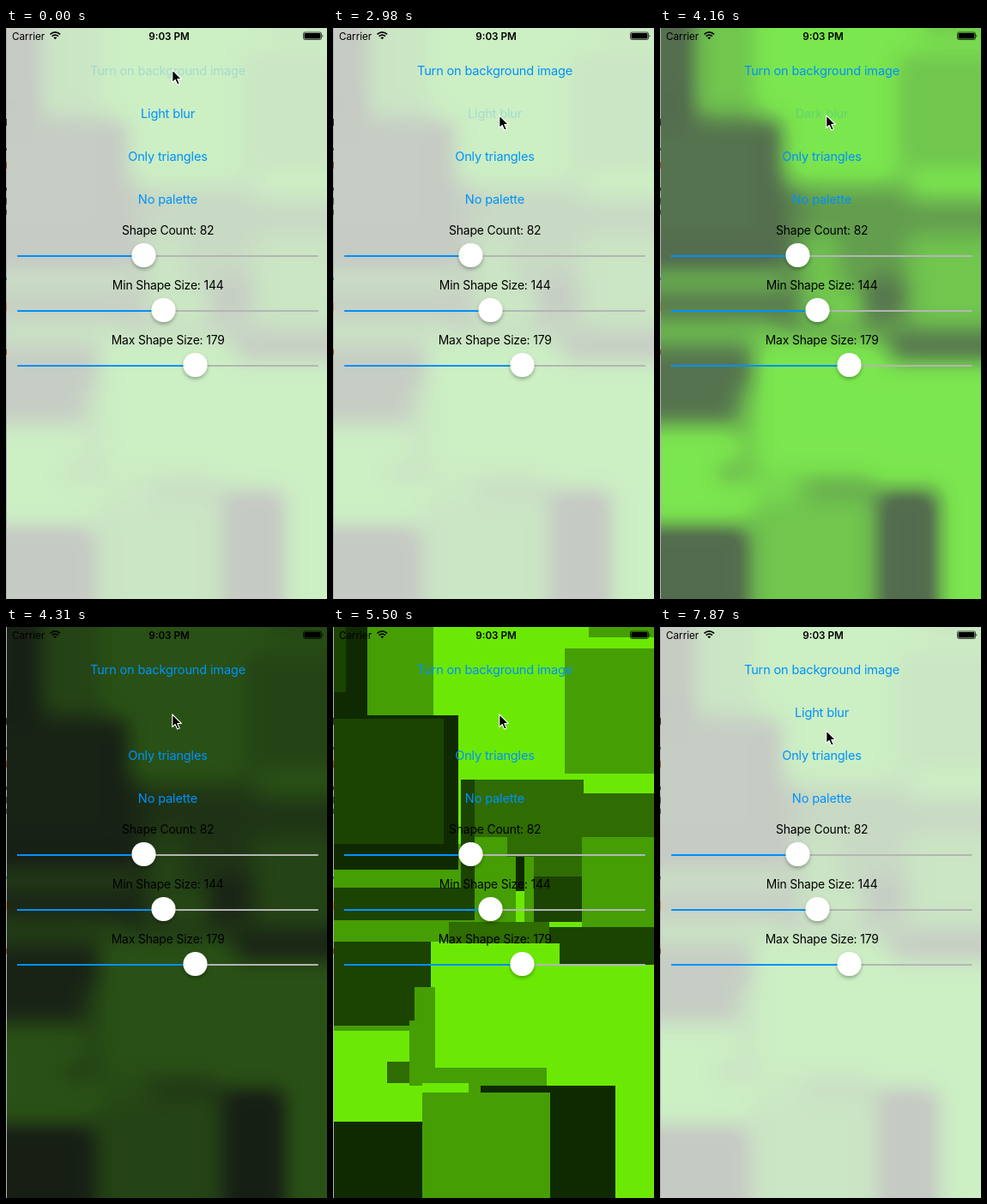
Animation of 374 by 666 pixels, one loop 8000 ms. Source, as an HTML page:

```html
<!DOCTYPE html>
<html lang="en">
<head>
<meta charset="utf-8">
<title>Background generator settings</title>
<style>
  html, body { margin: 0; width: 100%; height: 100%; overflow: hidden; }
  svg { display: block; width: 374px; height: 666px; }
  text { font-family: Inter, Roboto, sans-serif; text-anchor: middle; letter-spacing: -.16px; }
  .button { font-size: 14.55px; fill: #0091fa; }
  .label { font-size: 13.9px; }
  .status { font-size: 11.7px; letter-spacing: 0; }
</style>
</head>
<body>
<svg viewBox="0 0 374 666">
  <defs id="filters"></defs>
  <g id="shapes" shape-rendering="crispEdges"></g>
  <g id="edge" shape-rendering="crispEdges"><rect width="1" height="666" fill="#b2b0b5"/></g>

  <text class="status" x="7" y="13.5" style="text-anchor:start">Carrier</text>
  <g fill="none" stroke="#000" stroke-width="1.7">
    <path d="M51.5 7.4Q57.3 2.2 63.1 7.4M53.6 9.7Q57.3 6.4 61 9.7"/>
    <path d="M55.3 11.2Q57.3 9.6 59.3 11.2L57.3 13.3Z" fill="#000" stroke="none"/>
  </g>
  <text class="status" x="190" y="13.5" font-weight="600">9:03 PM</text>
  <rect x="346.5" y="5" width="21" height="8.5" rx="1.8" fill="none" stroke="#000" stroke-width=".7"/>
  <rect x="347.5" y="6" width="19" height="6.5" rx="1"/>
  <path d="M368.6 7.5q1.8 1.7 0 3.4z"/>

  <text id="title" class="button" x="188.5" y="54.5"></text>
  <text id="blur" class="button" x="188.5" y="104.5"></text>
  <text class="button" x="188.5" y="154.5">Only triangles</text>
  <text class="button" x="188.5" y="204.5">No palette</text>
  <g id="sliders"></g>
  <path id="cursor" d="M.8 .9V15.6L4.2 12.5L6.6 18L9.2 16.9L6.8 11.5H11.4Z"
        stroke="#fff" stroke-width="1.1" stroke-linejoin="round"/>
</svg>
<script>
const $ = id => document.getElementById(id);
const STAGE = [374, 666], BLEED = 60, LOOP = 8000;

// Shapes: colour, left, top, right, bottom
const palette = { A: '#6be905', B: '#459e03', C: '#2f6c01', D: '#1b4302', E: '#0f2a01' };
const shapes = `A 0 0 374 666
B 40 0 117 103
E 0 0 40 103
D 0 0 15 76
B 298 0 374 12
B 270 25 374 171
C 149 178 292 268
C 290 194 374 245
B 0 253 234 367
B 165 245 203 268
C 203 245 290 344
D 149 178 165 304
B 165 268 234 344
E 213 268 223 308
A 213 308 223 344
E 0 103 146 283
D 0 107 129 253
D 0 304 165 342
D 234 291 290 344
B 290 245 374 350
C 135 344 252 369
D 252 350 374 394
A 114 369 264 420
D 0 367 114 465
B 0 465 89 471
B 95 420 119 514
B 89 459 119 532
B 89 514 249 535
A 104 532 158 543
B 158 532 172 543
C 63 507 89 532
E 172 535 329 666
B 104 543 253 666
E 0 577 104 666`;

// Shapes touching the stage edge bleed past it, so blurring stays opaque there.
const bleed = (value, size) => value === 0 ? -BLEED : value === size ? size + BLEED : value;
$('shapes').innerHTML = shapes.split('\n').map(row => {
  const [colour, ...box] = row.split(' ');
  const [l, t, r, b] = box.map((v, i) => bleed(+v, STAGE[i % 2]));
  return `<rect x="${l}" y="${t}" width="${r - l}" height="${b - t}" fill="${palette[colour]}"/>`;
}).join('');

// Each blur maps the green channel onto a ramp between a dark and a bright tone.
const curve = [0, .1, .58, .9, 1];
const blurs = {
  extra: [[198, 200, 196], [205, 241, 196]],
  light: [[80, 98, 78], [125, 236, 78]],
  dark: [[22, 28, 22], [42, 83, 22]]
};
$('filters').innerHTML = Object.entries(blurs).map(([name, [low, high]]) => {
  const ramp = i => curve.map(k => ((low[i] + (high[i] - low[i]) * k) / 255).toFixed(3)).join(' ');
  const channels = ['R', 'G', 'B'].map((c, i) => `<feFunc${c} type="table" tableValues="${ramp(i)}"/>`);
  return `<filter id="${name}" filterUnits="userSpaceOnUse" color-interpolation-filters="sRGB"
      x="${-BLEED}" y="${-BLEED}" width="${STAGE[0] + 2 * BLEED}" height="${STAGE[1] + 2 * BLEED}">
    <feGaussianBlur stdDeviation="14"/>
    <feColorMatrix values="0 1 0 0 0 0 1 0 0 0 0 1 0 0 0 0 0 0 1 0"/>
    <feComponentTransfer>${channels.join('')}</feComponentTransfer></filter>`;
}).join('') + `<filter id="shadow" x="-50%" y="-50%" width="200%" height="200%">
    <feDropShadow dx="0" dy="2.5" stdDeviation="2" flood-opacity=".3"/></filter>`;

// Slivers of the window behind
$('edge').innerHTML += [[106, 8, '#333'], [140, 3, '#555'], [156, 8, '#a4502a'], [186, 4, '#444'],
  [198, 8, '#555'], [212, 6, '#555'], [291, 3, '#47a'], [320, 10, '#d08040'], [375, 6, '#b05020']]
  .map(([y, h, fill]) => `<rect y="${y}" width="1" height="${h}" fill="${fill}"/>`).join('');

$('sliders').innerHTML = [
  ['Shape Count: 82', 241, 160.5], ['Min Shape Size: 144', 305, 183.5], ['Max Shape Size: 179', 369, 220.5]
].map(([label, y, x]) => `<text class="label" x="188.7" y="${y}">${label}</text>
  <rect x="13" y="${y + 24}" width="351" height="2" rx="1" fill="#b5b5b5"/>
  <rect x="13" y="${y + 24}" width="${x - 13}" height="2" rx="1" fill="#0091fa"/>
  <circle cx="${x}" cy="${y + 24}" r="14" fill="#fff" filter="url(#shadow)"/>`).join('');

const TICK = 140;
const fade = [.2, 0, .45, .9, 1];   // pressed, then the new caption fades in
const titlePresses = [[0, 'Turn on background image', 'Turn off background image'],
  [1500, 'Turn off background image', 'Turn on background image']];
const blurPresses = [[-720, 'Extra light blur', 'Light blur', 'extra'], [2980, 'Light blur', 'Dark blur', 'light'],
  [4160, 'Dark blur', 'No blur', 'dark'], [5360, 'No blur', 'Extra light blur', ''],
  [7280, 'Extra light blur', 'Light blur', 'extra']];
const cursorStops = [[0, 48], [2230, 49], [2380, 52], [2530, 58], [2680, 101], [7870, 120]];

const latest = (list, t) => list.findLast(([start]) => start <= t);

function setButton(id, presses, t) {
  const [start, before, after] = latest(presses, t);
  const step = Math.min(Math.floor((t - start) / TICK), fade.length - 1);
  $(id).textContent = step ? after : before;
  $(id).setAttribute('opacity', fade[step]);
}

let shownBlur;
function draw() {
  const t = performance.now() % LOOP;
  setButton('title', titlePresses, t);
  setButton('blur', blurPresses, t);
  const blur = latest(blurPresses, t - TICK)[3];
  if (blur !== shownBlur) {
    $('shapes').setAttribute('filter', blur ? `url(#${blur})` : 'none');
    shownBlur = blur;
  }
  $('cursor').setAttribute('transform', `translate(193 ${latest(cursorStops, t)[1]})`);
  requestAnimationFrame(draw);
}
draw();
</script>
</body>
</html>
```
